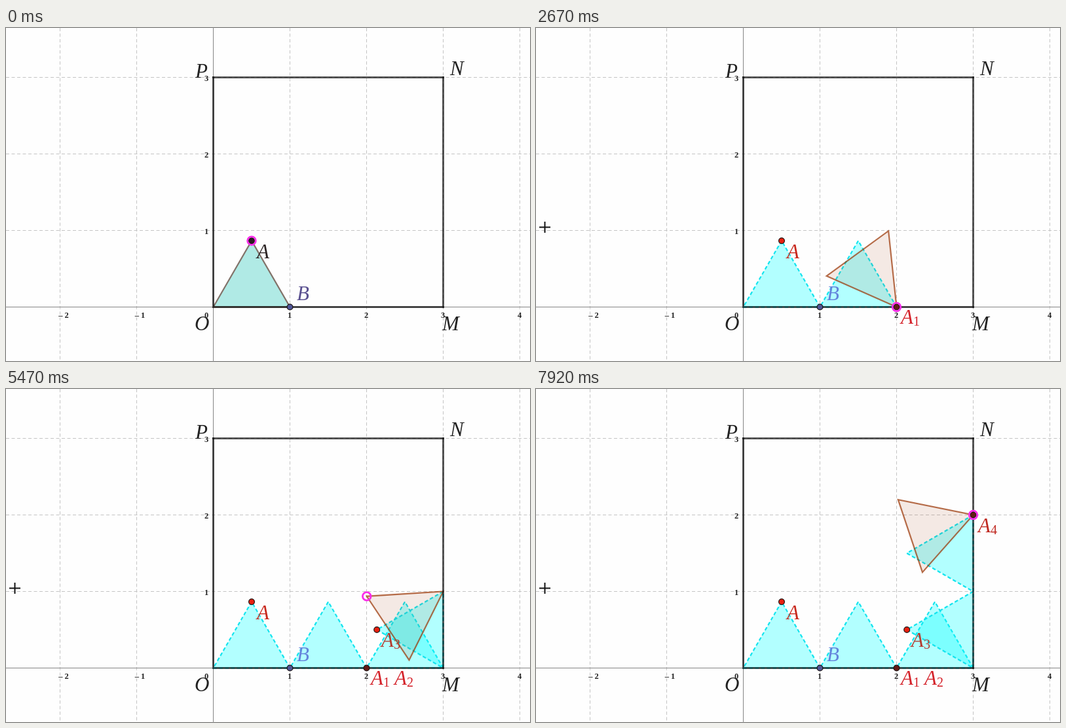
An HTML page with a canvas for the animation above (7990 ms loop, 800 px wide and 509 px high).

```html
<!DOCTYPE html>
<html lang="en">
<head>
<meta charset="utf-8">
<title>Rolling triangle</title>
<style>
html, body { margin: 0; width: 100%; height: 100%; overflow: hidden; background: #fefefe; }
canvas { display: block; }
</style>
</head>
<body>
<canvas id="stage" width="800" height="509"></canvas>
<script>
const ctx = document.getElementById('stage').getContext('2d');
const LOOP = 7990, STEP = 66.58, UNIT = 117;
const px = x => 316.5 + x * UNIT;
const py = y => 426.5 - y * UNIT;
const H = Math.sqrt(3) / 2;
const SERIF = '"Liberation Serif", serif';

// Total rolled angle in degrees at given steps
const ROLL = [[0, 0], [27, 97.8], [54, 193.6], [72, 259.8], [92, 333], [105, 378.9], [119, 431.5]];

// Each turn: pivot, angle already rolled, direction of the first free corner,
// and which corner is A (0 and 1 are free, 2 is the pivot)
const TURNS = [
  { x: 1, y: 0, from: 0, dir: 180, a: 1 },
  { x: 2, y: 0, from: 120, dir: 180, a: 2 },
  { x: 3, y: 0, from: 240, dir: 180, a: 0 },
  { x: 3, y: 1, from: 270, dir: 270, a: 1 },
  { x: 3, y: 2, from: 390, dir: 270, a: 2 }
];

// Resting triangles, one per turn
const RESTS = [
  [[0, 0], [1, 0], [0.5, H]],
  [[1, 0], [2, 0], [1.5, H]],
  [[2, 0], [3, 0], [2.5, H]],
  [[3, 0], [3, 1], [3 - H, 0.5]],
  [[3, 1], [3, 2], [3 - H, 1.5]]
];

function rolled(step) {
  const i = Math.max(1, ROLL.findIndex(k => k[0] >= step));
  const [s0, r0] = ROLL[i - 1], [s1, r1] = ROLL[i];
  return r0 + (r1 - r0) * (step - s0) / (s1 - s0);
}

function line(x0, y0, x1, y1) {
  ctx.beginPath();
  ctx.moveTo(x0, y0);
  ctx.lineTo(x1, y1);
  ctx.stroke();
}

function polygon(points, fill, stroke, width, dash = []) {
  ctx.beginPath();
  points.forEach(([x, y]) => ctx.lineTo(px(x), py(y)));
  ctx.closePath();
  if (fill) {
    ctx.fillStyle = fill;
    ctx.fill();
  }
  if (!stroke) return;
  ctx.setLineDash(dash);
  ctx.strokeStyle = stroke;
  ctx.lineWidth = width;
  ctx.stroke();
  ctx.setLineDash([]);
}

function dot(x, y, color) {
  ctx.beginPath();
  ctx.arc(px(x), py(y), 4.4, 0, 7);
  ctx.fillStyle = color;
  ctx.fill();
  ctx.strokeStyle = '#1c1414';
  ctx.lineWidth = 1.2;
  ctx.stroke();
}

function text(str, x, y, font, color, align = 'left') {
  ctx.font = font + ' ' + SERIF;
  ctx.fillStyle = color;
  ctx.textAlign = align;
  ctx.fillText(str, x, y);
}

function label(str, x, y, color, sub) {
  text(str, x, y, 'italic 31px', color);
  if (sub) text(sub, x + 19, y + 3, '20px', color);
}

function drawGrid() {
  ctx.lineWidth = 1;
  ctx.strokeStyle = '#c4c4c4';
  ctx.setLineDash([5, 3.5]);
  for (let i = -2; i <= 4; i++) if (i) line(px(i), 0, px(i), 509);
  for (let i = 1; i <= 3; i++) line(0, py(i), 800, py(i));
  ctx.setLineDash([]);
  ctx.strokeStyle = '#858585';
  line(px(0), 0, px(0), 509);
  line(0, py(0), 800, py(0));
}

function drawNumbers() {
  const put = (s, x, y) => text(s, x, y, 'bold 12.5px', '#222', 'center');
  put('– 2', 88, 443);
  put('– 1', 204.5, 443);
  put('0', 306, 443);
  for (let i = 1; i <= 4; i++) put(i, px(i) - 0.5, 443);
  for (let i = 1; i <= 3; i++) put(i, 306, py(i) + 5);
}

function drawCross() {
  ctx.strokeStyle = '#111';
  ctx.lineWidth = 2;
  line(5, 304.5, 22, 304.5);
  line(13.5, 296, 13.5, 313);
}

function draw(time) {
  const step = Math.min(119, Math.floor((time % LOOP + 10) / STEP));
  const roll = rolled(step);
  const turnNo = TURNS.filter(t => roll >= t.from).length - 1;
  const turn = TURNS[turnNo];
  const still = step === 0;

  ctx.fillStyle = '#fefefe';
  ctx.fillRect(0, 0, 800, 509);
  drawGrid();

  RESTS.slice(0, turnNo + 1).forEach(r =>
    polygon(r, 'rgba(0,255,255,.3)', still ? null : '#14e4ee', 2.2, [5.5, 3.5]));

  const corners = [0, 60].map(off => {
    const a = (turn.dir - off - (roll - turn.from)) * Math.PI / 180;
    return [turn.x + Math.cos(a), turn.y + Math.sin(a)];
  });
  corners.push([turn.x, turn.y]);
  polygon(corners, 'rgba(153,51,0,.1)', still ? '#82736a' : 'rgba(153,51,0,.7)', 2.2);

  polygon([[0, 0], [3, 0], [3, 3], [0, 3]], null, 'rgba(0,0,0,.65)', 3);
  ctx.fillStyle = '#222';
  [[0, 3], [3, 3], [3, 0]].forEach(([x, y]) => ctx.fillRect(px(x) - 1.5, py(y) - 1.5, 3, 3));

  drawNumbers();

  dot(0.5, H, still ? '#2a1c20' : '#e8200f');
  dot(1, 0, '#4f5596');
  if (turnNo >= 1) dot(2, 0, '#641a16');
  if (turnNo >= 3) dot(3 - H, 0.5, '#e8200f');
  if (turnNo >= 4) dot(3, 2, '#641a16');

  const [ax, ay] = corners[turn.a];
  ctx.beginPath();
  ctx.arc(px(ax), py(ay), 6.3, 0, 7);
  ctx.strokeStyle = '#fb2cea';
  ctx.lineWidth = 2.8;
  ctx.stroke();

  label('P', 289, 76, '#222');
  label('N', 678, 72, '#222');
  label('O', 288, 462, '#222');
  label('M', 666, 462, '#222');
  label('A', 383, 352, still ? '#2c2424' : '#c8281c');
  label('B', 444, 416, still ? '#5a5090' : turnNo ? '#6484dc' : '#7a58c0');
  if (turnNo >= 1) label('A', 557, 452, '#d4222a', '1');
  if (turnNo >= 2) label('A', 593, 452, '#d4222a', '2');
  if (turnNo >= 3) label('A', 573, 394, '#b43c30', '3');
  if (turnNo >= 4) label('A', 675, 219, '#c02a22', '4');

  if (step >= 18) drawCross();
}

const start = performance.now();
function tick() {
  draw(performance.now() - start);
  requestAnimationFrame(tick);
}
tick();
</script>
</body>
</html>
```
